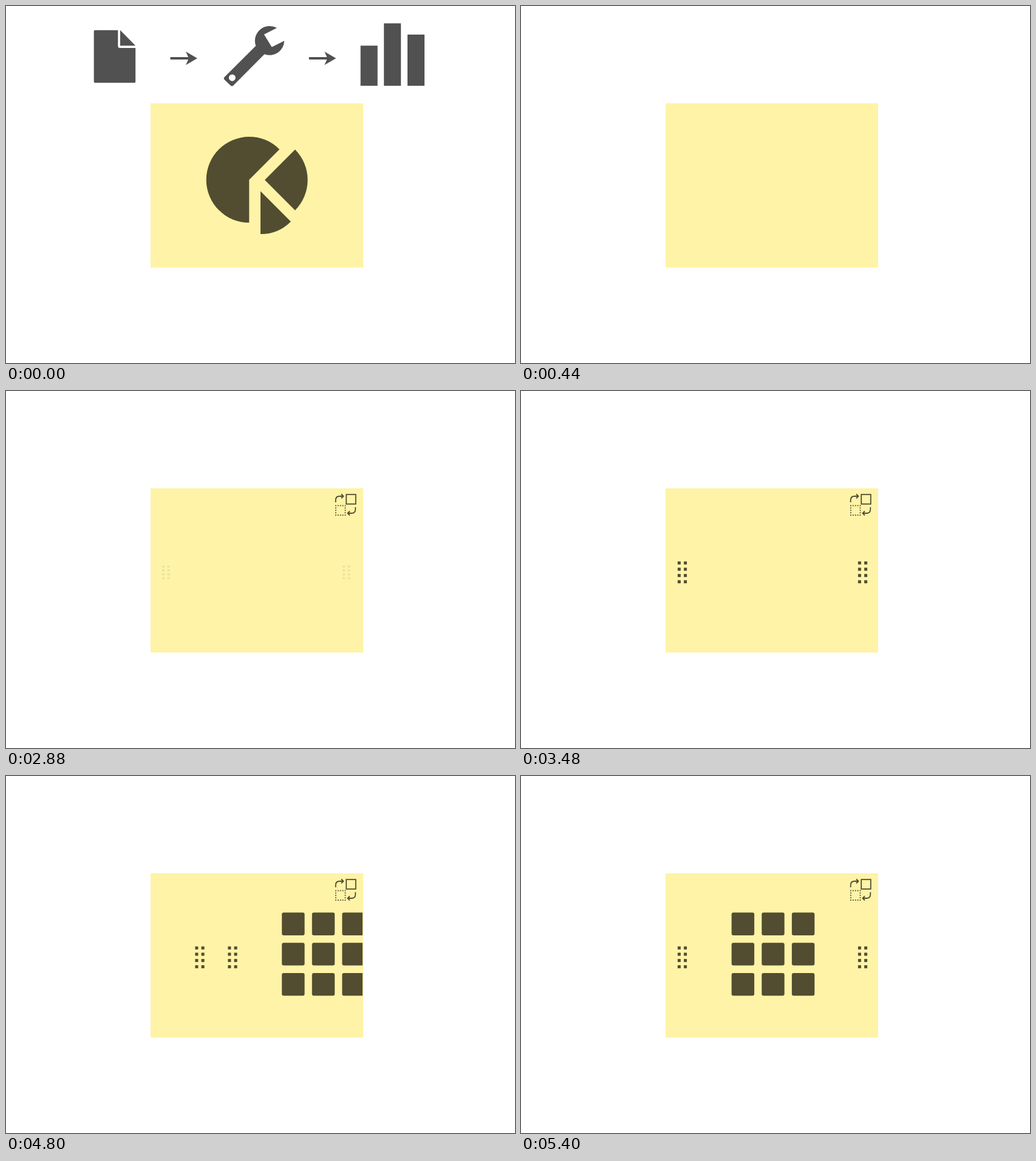
These frames come from a looping animation (838x587 px, 5560 ms). An HTML page with a canvas:

```html
<!DOCTYPE html>
<html lang="en">
<head>
<meta charset="utf-8">
<title>Panels</title>
<style>
html, body { margin: 0; width: 100%; height: 100%; overflow: hidden; background: #fff; }
canvas { display: block; }
</style>
</head>
<body>
<canvas id="stage" width="838" height="587"></canvas>
<script>
const ctx = document.getElementById('stage').getContext('2d');
const LOOP = 5560, STEP = 40;
const GRAY = '#515151', DARK = '#524d30', YELLOW = '#fef3a7';
const PANEL = { x: 238, y: 160, w: 350, h: 270 };
const PAGE = 351;

const clamp = v => Math.max(0, Math.min(1, v));
const span = (t, from, to) => clamp((t - from) / (to - from));

function poly(...pts) {
  ctx.beginPath();
  pts.forEach(([x, y]) => ctx.lineTo(x, y));
  ctx.closePath();
  ctx.fill();
}

function sector(x, y, r, from, to) {
  ctx.beginPath();
  ctx.moveTo(x, y);
  ctx.arc(x, y, r, from * Math.PI, to * Math.PI);
  ctx.fill();
}

function box(x, y, w, h, r) {
  ctx.beginPath();
  ctx.roundRect(x, y, w, h, r);
  ctx.fill();
}

// Grows past full size, then settles at 1.
function pop(u, from, peak) {
  const top = 0.45;
  if (u < top) return from + (peak - from) * Math.sin(u / top * Math.PI / 2);
  return 1 + (peak - 1) * (1 + Math.cos((u - top) / (1 - top) * Math.PI)) / 2;
}

function drawFile() {
  ctx.fill(new Path2D('M146.5 39.8H184.3V65.5Q184.3 69 187.8 69H213.2V124.5Q213.2 126.2 211.5 126.2H146.5Q144.7 126.2 144.7 124.5V41.5Q144.7 39.8 146.5 39.8Z'));
  poly([188, 39.8], [213.2, 65.2], [188, 65.2]);
}

function drawArrow(x) {
  ctx.fillRect(x, 84, 33, 4);
  poly([x + 44.5, 86], [x + 25.5, 75], [x + 30.5, 86], [x + 25.5, 97]);
}

function drawWrench() {
  ctx.fill(new Path2D('M446 36L424.8 46.8L437.6 67.5L458.2 57.2A24.3 24.3 0 0 1 425.5 79.3L374.5 130.6Q372 133 369.5 130.6L359.8 121.3Q357.5 119 359.8 116.7L411.3 65.5A24.3 24.3 0 0 1 446 36Z'));
  ctx.fillStyle = '#fff';
  sector(372.4, 117.9, 5.5, 0, 2);
}

function drawIntro(alpha) {
  ctx.globalAlpha = alpha;
  ctx.fillStyle = GRAY;
  drawFile();
  drawArrow(270.5);
  drawArrow(498.8);
  for (const [x, y] of [[583.7, 65.2], [622.2, 28.5], [661, 47]]) {
    ctx.fillRect(x, y, 28, 131.2 - y);
  }
  drawWrench();
  ctx.fillStyle = DARK;
  sector(400.3, 285.7, 70.6, 0.5, 1.75);
  sector(426, 286, 70.6, -0.25, 0.25);
  sector(419, 304.5, 70.6, 0.25, 0.5);
  ctx.globalAlpha = 1;
}

function drawSwap(u) {
  if (!u) return;
  const s = pop(u, 0, 1.6), cx = 559, cy = 187;
  ctx.save();
  ctx.globalAlpha = u;
  ctx.translate(cx, cy);
  ctx.scale(s, s);
  ctx.strokeStyle = ctx.fillStyle = DARK;
  ctx.lineWidth = 1.8;
  ctx.strokeRect(1.2, -16.8, 15.6, 15.6);
  // The two curved arrows are half-turn copies.
  for (let i = 0; i < 2; i++) {
    ctx.stroke(new Path2D('M-16.3 -4V-7.5Q-16.3 -14 -9.8 -14H-3.8M-7 -17.5L-3.5 -14L-7 -10.5'));
    ctx.rotate(Math.PI);
  }
  const side = 15.6, n = 4;
  for (let i = 0; i <= n; i++) {
    for (let j = 0; j <= n; j++) {
      if (i % n && j % n) continue;
      ctx.fillRect(-17 + i * side / n, 0.6 + j * side / n, 1.8, 1.8);
    }
  }
  ctx.restore();
}

function drawGrip(x, y, sx, sy) {
  ctx.save();
  ctx.translate(x, y);
  ctx.scale(sx, sy);
  for (let i = 0; i < 8; i++) {
    ctx.fillRect((i % 2) * 10.2 - 7.6, (i >> 1) * 10.3 - 17.95, 5, 5);
  }
  ctx.restore();
}

function drawGrips(offset, t) {
  const u = span(t, 2840, 3240);
  if (!u) return;
  const x = offset - 2.2 * (1 - span(t, 3240, 3400));
  ctx.globalAlpha = u;
  for (const home of [265.5, 562.5]) {
    drawGrip(home + x, 298.2, pop(u, 0.5, 1.44), pop(u, 0.2, 1.44));
  }
  ctx.globalAlpha = 1;
}

function drawTiles(offset) {
  for (let i = 0; i < 9; i++) {
    box(346.7 + (i % 3) * 49.6 + offset, 224.5 + Math.floor(i / 3) * 49.7, 37.4, 37.4, 3);
  }
}

// Steady slide that eases out at the end.
function slide(t) {
  const mid = 243.5;
  if (t <= 4800) return mid * span(t, 4120, 4800);
  const u = span(t, 4800, 5240), v = 1 - u;
  const start = mid / 680 * 440;
  return mid + (PAGE - mid) * u * u * (3 - 2 * u) + start * u * v * v;
}

function draw(t) {
  ctx.fillStyle = '#fff';
  ctx.fillRect(0, 0, 838, 587);
  ctx.fillStyle = YELLOW;
  ctx.fillRect(PANEL.x, PANEL.y, PANEL.w, PANEL.h);

  const intro = 1 - span(t, 80, 440);
  if (t < 120) drawIntro(1);
  else if (intro) drawIntro(intro);

  const shift = slide(t);
  ctx.save();
  ctx.beginPath();
  ctx.rect(PANEL.x, PANEL.y, PANEL.w - 1, PANEL.h);
  ctx.clip();
  ctx.fillStyle = DARK;
  drawGrips(-shift, t);
  if (shift) {
    drawGrips(PAGE - shift, t);
    drawTiles(PAGE - shift);
  }
  ctx.restore();
  drawSwap(span(t, 1480, 1880));
}

const begin = performance.now();
function tick() {
  const t = (performance.now() - begin) % LOOP;
  draw(Math.floor(t / STEP) * STEP);
  requestAnimationFrame(tick);
}
tick();
</script>
</body>
</html>
```
